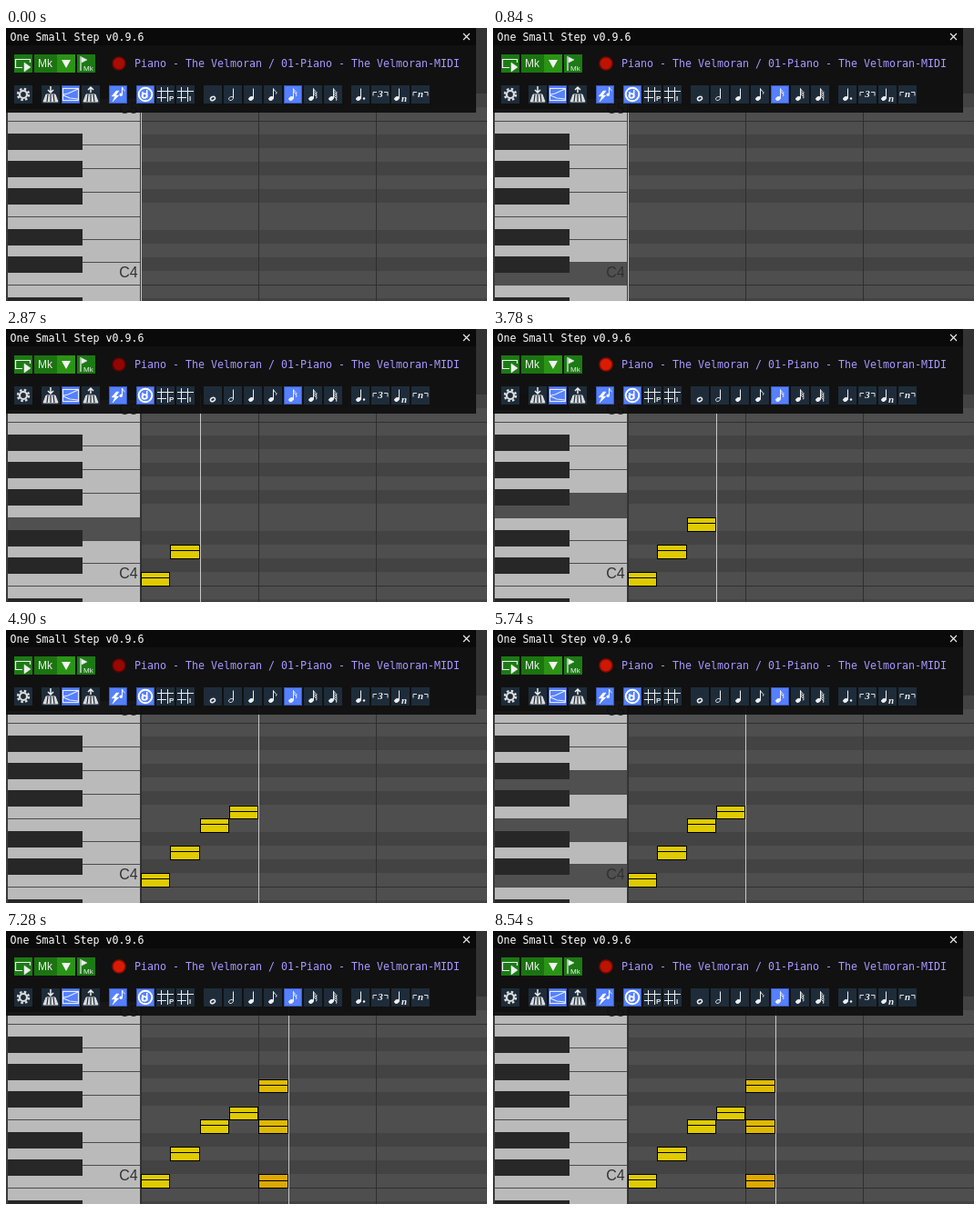
These frames come from a looping animation (528x300 px, 8610 ms). An HTML page:

```html
<!DOCTYPE html>
<html>
<head>
<meta charset="utf-8">
<title>Step input</title>
<style>
html, body { margin: 0; width: 528px; height: 300px; overflow: hidden; background: #333; }
svg { display: block; }
.mono { font: 11.63px "DejaVu Sans Mono", monospace; white-space: pre; }
.sans { font-family: "Liberation Sans", sans-serif; }
.serif { font: italic bold 11px "Liberation Serif", serif; }
.crisp { shape-rendering: crispEdges; }
</style>
</head>
<body>
<svg id="stage" width="528" height="300" viewBox="0 0 528 300"></svg>
<script>
const LOOP = 8610, ROW = 15, C4_TOP = 267, LEFT = 148, STEP = 32.3;
const BLACK = [1, 3, 6, 8, 10];
const isBlack = n => BLACK.includes((n + 24) % 12);
const rowTop = n => C4_TOP - n * ROW;
const stepX = i => Math.round(LEFT + i * STEP);

// Notes are semitones above C4
const steps = [
  { notes: [0], down: 280, insert: 980, up: 1330 },
  { notes: [2], down: 1400, insert: 2100, up: 2520 },
  { notes: [4], down: 2590, insert: 3220, up: 3570 },
  { notes: [5], down: 3710, insert: 4410, up: 4900, split: 7 },
  { notes: [0, 4, 7], down: 5460, insert: 6440, up: 6790, split: 7, fills: ['#dda900', '#deb800', '#dfbb00'] },
];

const rect = (x, y, w, h, fill, more = '') =>
  `<rect x="${x}" y="${y}" width="${w}" height="${h}" fill="${fill}" ${more}/>`;
const path = (d, stroke = '#eee', width = 1.2, fill = 'none') =>
  `<path d="${d}" stroke="${stroke}" stroke-width="${width}" fill="${fill}"/>`;
const text = (x, y, str, fill, cls, more = '') =>
  `<text x="${x}" y="${y}" fill="${fill}" class="${cls}" ${more}>${str}</text>`;

function grid() {
  let out = '';
  for (let n = -3; n < 14; n++)
    out += rect(LEFT, rowTop(n), 380, ROW, isBlack(n) ? '#434343' : '#4e4e4e');
  for (const y of [102, 282]) out += rect(LEFT, y, 380, 1, '#303030');
  for (const x of [148, 277, 406]) out += rect(x, 72, 1, 228, '#2e2e2e');
  return out;
}

function keyboard() {
  let white = '', black = '';
  let bottom = 282 + 105 / 4;
  for (let n = -1; n < 14; n++) {
    if (isBlack(n)) continue;
    const height = (n + 12) % 12 < 5 ? 25 : 105 / 4;
    const top = Math.floor(bottom - height);
    white += rect(2, top, 145, Math.floor(bottom) - top, '#bababa', `data-key="${n}"`);
    white += rect(2, top, 145, 1, '#4c4c4c');
    bottom -= height;
  }
  for (let n = -2; n < 14; n++)
    if (isBlack(n)) black += rect(2, rowTop(n) - 1, 82, 18, '#272727');
  return rect(0, 72, 148, 228, '#3a3a3a') + white + black;
}

function noteBar(index, n, fill, split = 6) {
  const x = stepX(index), width = stepX(index + 1) - x;
  const row = rowTop(n), top = Math.round(C4_TOP + .2 - n * 14.93);
  return rect(x, top, width, row + ROW - top + 1, '#000') +
    rect(x + 1, top + 1, width - 2, row + ROW - top - 1, fill) +
    rect(x, row + split, width, 1, '#000');
}

// Glyphs are drawn in a 20 by 20 box
const keysIcon = arrow => path('M5 10L2 18H18L15 10Z', '#ddd', 1, '#ddd') +
  path('M7 10L6 18M10 10V18M13 10L14 18', '#1e2c3a') + path(arrow, '#eee', 1.5);
const head = (x, hollow, width = .8) => `<ellipse cx="${x}" cy="14.5" rx="2.6" ry="1.9"
  transform="rotate(-25 ${x} 14.5)" fill="${hollow ? 'none' : '#eee'}" stroke="#eee" stroke-width="${width}"/>`;
const noteIcon = (flags = 0, hollow = false, x = 8) => {
  let out = head(x, hollow) + path(`M${x + 2.5} 14V3.5`, '#eee', 1);
  for (let i = 0; i < flags; i++) out += path(`M${x + 2.5} ${3.5 + i * 2.4}q.4 2 2.4 3t.6 3`, '#eee', 1);
  return out;
};
const hash = letter => path('M5.5 2V18M12.5 2V18M1 6.5H19M1 13.5H11', '#eee', 1) +
  text(14, 17, letter, '#eee', 'sans', 'font-size="8" font-weight="bold"');
const bracket = label => path('M2 11.5V7.5H6M14 7.5H18V11.5', '#ddd', 1) +
  text(10, 13, label, '#eee', 'serif', 'text-anchor="middle"');
const gear = '<circle cx="10" cy="10" r="6" fill="none" stroke="#ddd" stroke-width="2.4" stroke-dasharray="2.5 2.21"/>' +
  '<circle cx="10" cy="10" r="4" fill="none" stroke="#ddd" stroke-width="2.2"/>';
const slopes = path('M1.5 3.5H18.5V16.5H1.5ZM2 10L7 9L18 4M2 11L9 14L18 15', '#e8edff', 1.1);
const flash = path('M8 6L3 12H6.5L4 18L11 11H7.5L11 6Z', '#fff', .4, '#fff') +
  path('M14.5 10V2q.5 2.5 3 4', '#fff', 1) + '<circle cx="13.2" cy="10.3" r="1.7" fill="#fff"/>';
const coin = '<circle cx="10" cy="10" r="7.3" fill="none" stroke="#fff" stroke-width="1.9"/>' +
  '<ellipse cx="9" cy="11.5" rx="2.6" ry="2.3" fill="none" stroke="#fff" stroke-width="1.7"/>' +
  path('M11.7 13.5V5M7 7V13', '#fff', 1.5);

const tools = [
  [9, gear], [39, keysIcon('M10 1V8M7 5L10 8L13 5')], [61, slopes, true],
  [83, keysIcon('M10 8V2M7 5L10 2L13 5')], [113, flash, true],
  [143, coin, true], [165, hash('P')], [187, hash('I')],
  [217, head(10, true, 1.5)], [239, noteIcon(0, true)], [261, noteIcon()], [283, noteIcon(1)],
  [305, noteIcon(2), true], [327, noteIcon(3)], [349, noteIcon(4)],
  [379, noteIcon() + '<circle cx="14" cy="14.5" r="1.2" fill="#eee"/>'], [401, bracket('3')],
  [423, noteIcon(0, false, 6) + text(11, 18, 'n', '#eee', 'serif')], [445, bracket('n')],
];

const button = ([x, icon, on]) => `<g transform="translate(${x} 63)">` +
  (on ? rect(.5, .5, 19, 19, '#5580ff', 'stroke="#3c5bb8"') : rect(0, 0, 20, 20, '#1e2c3a')) + icon + '</g>';

function panel() {
  const voice = 'The Velmoran';
  return rect(0, 0, 516, 93, '#0f0f0f', 'opacity=".95"') + rect(0, 0, 516, 19, '#0a0a0a') +
    text(4.5, 14, 'One Small Step v0.9.6', '#fff', 'mono') +
    path('M502 6L509 13M509 6L502 13', '#eee', 1.1) +
    rect(9, 29, 20, 20, '#1c7a14') + path('M18 43.5H10.5V34.5H26.5V38', '#eee', 1.2) +
    path('M20 38L27 43L20 48Z', '#eee', .5, '#eee') +
    rect(31, 29, 25, 20, '#1b7410') + text(35, 43, 'Mk', '#eee', 'sans', 'font-size="12"') +
    rect(56, 29, 20, 20, '#2a9415') + path('M61 35H71L66 44Z', 'none', 0, '#f4f4f4') +
    rect(78, 29, 20, 20, '#1c7a14') + path('M82 31V47', '#eee', 1.2) +
    path('M83 32L89 35L83 38Z', '#eee', .5, '#eee') +
    text(85, 47, 'Mk', '#eee', 'sans', 'font-size="8"') +
    '<circle id="record" cx="124" cy="39" r="7" stroke-width="1.6"/>' +
    text(141, 43, `Piano - ${voice} / 01-Piano - ${voice}-MIDI`, '#a898ff', 'mono') +
    tools.map(button).join('');
}

const stage = document.getElementById('stage');
stage.innerHTML = '<g class="crisp">' + grid() + keyboard() + '</g>' +
  [0, 12].map(n => text(124.3, rowTop(n) + 7, 'C' + (4 + n / 12), '#303030', 'sans', 'font-size="16"')).join('') +
  '<g class="crisp">' + steps.map((s, i) => '<g class="step">' +
    s.notes.map((n, k) => noteBar(i, n, s.fills ? s.fills[k] : '#dfcb00', s.split)).join('') + '</g>').join('') +
  rect(0, 72, 1, 228, '#c8c8c8', 'id="cursor"') + '</g>' + panel();

const keys = [...stage.querySelectorAll('[data-key]')];
const bars = [...stage.querySelectorAll('.step')];
const cursor = document.getElementById('cursor');
const record = document.getElementById('record');

function draw(t) {
  const held = steps.filter(s => t >= s.down && t < s.up).flatMap(s => s.notes);
  for (const key of keys)
    key.setAttribute('fill', held.includes(+key.dataset.key) ? '#505050' : '#bababa');
  bars.forEach((bar, i) => bar.setAttribute('visibility', t >= steps[i].insert ? 'visible' : 'hidden'));
  cursor.setAttribute('x', stepX(steps.filter(s => t >= s.insert).length));
  const glow = .5 + .5 * Math.cos((t - 490) / 1680 * 2 * Math.PI);
  record.setAttribute('fill', `rgb(${140 + 78 * glow}, ${4 + 24 * glow}, 0)`);
  record.setAttribute('stroke', `rgb(${85 + 60 * glow}, ${4 + 8 * glow}, 4)`);
}

const start = performance.now();
(function frame() {
  draw((performance.now() - start) % LOOP);
  requestAnimationFrame(frame);
})();
</script>
</body>
</html>
```
